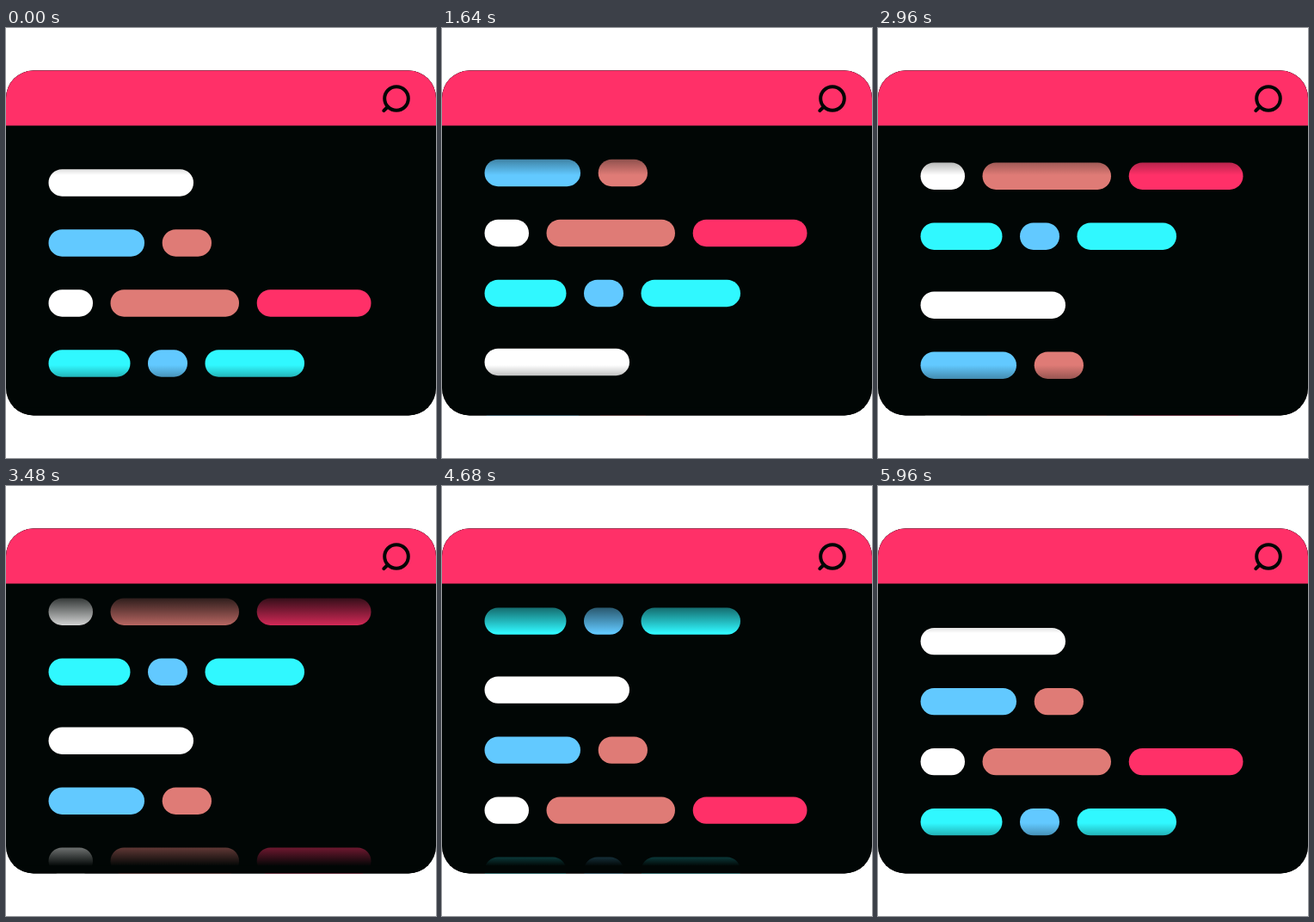
Recreate the animation shown at these times as an HTML page. Size 500 by 500 pixels, loop 6000 ms.

```html
<!DOCTYPE html>
<html lang="en">
<head>
<meta charset="utf-8">
<title>Scrolling code window</title>
<style>
html, body { margin: 0; width: 100%; height: 100%; overflow: hidden; background: #fff; }
svg { display: block; width: 100%; height: 100%; }
</style>
</head>
<body>
<svg viewBox="0 0 500 500">
  <defs>
    <clipPath id="window"><rect y="49.5" width="500" height="401" rx="32"/></clipPath>
    <linearGradient id="top" x2="0" y2="1">
      <stop stop-color="#010605"/>
      <stop offset="1" stop-color="#010605" stop-opacity="0"/>
    </linearGradient>
    <linearGradient id="bottom" x2="0" y2="1">
      <stop stop-color="#010605" stop-opacity="0"/>
      <stop offset="1" stop-color="#010605"/>
    </linearGradient>
  </defs>
  <g clip-path="url(#window)">
    <rect width="500" height="500" fill="#010605"/>
    <g id="scroll">
      <g id="rows"></g>
      <use href="#rows" y="290"/>
    </g>
    <rect y="120" width="500" height="51" fill="url(#top)"/>
    <rect y="392" width="500" height="50" fill="url(#bottom)"/>
    <rect y="441.5" width="500" height="10" fill="#010605"/>
    <rect width="500" height="121" fill="#010605"/>
    <rect width="500" height="113.5" fill="#ff3068"/>
    <g fill="none" stroke="#010605" stroke-width="4" stroke-linecap="round">
      <circle cx="454" cy="82" r="13.8"/>
      <path d="M444 91.5L439.3 96.2"/>
    </g>
  </g>
</svg>
<script>
const LOOP = 6000, PERIOD = 290, SPACING = 70;
const white = '#fff', blue = '#62c9ff', salmon = '#df7b76', pink = '#ff3068', cyan = '#30f8ff';

// Each bar: left, right, colour
const lines = [
  [[49.5, 218, white]],
  [[49.5, 161, blue], [181.7, 239, salmon]],
  [[49.5, 101, white], [121.5, 271, salmon], [291.7, 424.5, pink]],
  [[49.5, 144.5, cyan], [165, 211, blue], [231.5, 347, cyan]]
];

document.getElementById('rows').innerHTML = lines.map((bars, i) =>
  bars.map(([x, right, fill]) =>
    `<rect x="${x}" y="${164.3 + i * SPACING}" width="${right - x}" height="31.4" rx="15.7" fill="${fill}"/>`
  ).join('')
).join('');

const bezier = (a, b, s) => 3 * (1 - s) ** 2 * s * a + 3 * (1 - s) * s * s * b + s ** 3;

// Nearly linear, braking just before the loop closes
function ease(x) {
  let lo = 0, hi = 1;
  for (let i = 0; i < 30; i++) {
    const mid = (lo + hi) / 2;
    if (bezier(0.33, 0.95, mid) < x) lo = mid; else hi = mid;
  }
  return bezier(0.333, 1, lo);
}

const scroll = document.getElementById('scroll');
function draw() {
  const y = -PERIOD * ease(performance.now() % LOOP / LOOP);
  scroll.setAttribute('transform', `translate(0 ${y})`);
  requestAnimationFrame(draw);
}
draw();
</script>
</body>
</html>
```
